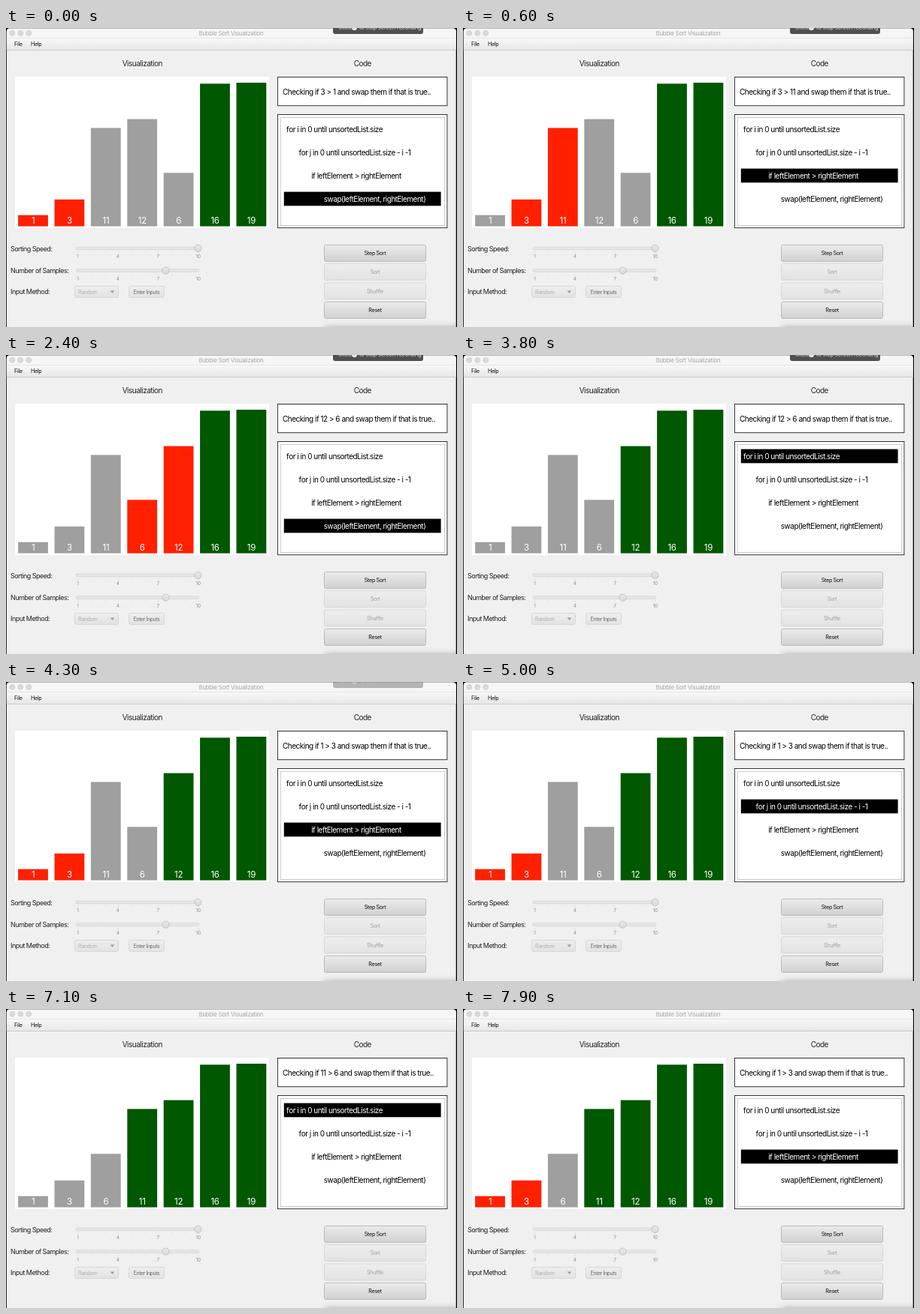
Write an HTML page with a canvas that moves like this. It is 600 by 399 pixels and loops after 8 s.

```html
<!DOCTYPE html>
<html lang="en">
<head>
<meta charset="utf-8">
<title>Bubble Sort Visualization</title>
<style>
html, body { margin: 0; width: 100%; height: 100%; overflow: hidden; background: #f0f0f0; }
canvas { display: block; width: 600px; height: 399px; }
</style>
</head>
<body>
<canvas id="stage"></canvas>
<script>
const W = 600, H = 399, LOOP = 8000;
const canvas = document.getElementById('stage');
const ctx = canvas.getContext('2d');
const dpr = window.devicePixelRatio || 1;
canvas.width = W * dpr;
canvas.height = H * dpr;

const RED = '#ff2000', GRAY = '#9f9f9f', GREEN = '#005800';
const barTop = { 1: 249.7, 3: 228.8, 6: 193.3, 11: 133.4, 12: 121.6, 16: 74.3, 19: 73 };
const code = [
  'for i in 0 until unsortedList.size',
  'for j in 0 until unsortedList.size - i -1',
  'if leftElement > rightElement',
  'swap(leftElement, rightElement)'
];

const start = [1, 3, 11, 12, 6, 16, 19];
const second = [1, 3, 11, 6, 12, 16, 19];
const third = [1, 3, 6, 11, 12, 16, 19];

// at: time in ms, line: highlighted code line, pair: left red bar, sorted: green bars
const steps = [
  { at: 0, line: 3, list: start, pair: 0, sorted: 2, test: '3 > 1' },
  { at: 500, line: 1 },
  { at: 600, line: 2, pair: 1, test: '3 > 11' },
  { at: 1400, line: 1 },
  { at: 1500, line: 2, pair: 2, test: '11 > 12' },
  { at: 2300, line: 1 },
  { at: 2400, line: 3, list: second, pair: 3, test: '12 > 6' },
  { at: 3200, line: 0, pair: -9, sorted: 3 },
  { at: 4100, line: 1 },
  { at: 4200, line: 2, pair: 0, test: '1 > 3' },
  { at: 5000, line: 1 },
  { at: 5100, line: 2, pair: 1, test: '3 > 11' },
  { at: 5900, line: 1 },
  { at: 6000, line: 3, list: third, pair: 2, test: '11 > 6' },
  { at: 6800, line: 0, pair: -9, sorted: 4 },
  { at: 7700, line: 1 },
  { at: 7800, line: 2, pair: 0, test: '1 > 3' }
];

function stateAt(t) {
  return Object.assign({}, ...steps.filter(s => s.at <= t));
}

function text(str, x, y, size, color = '#111', align = 'left', track = -0.05) {
  ctx.font = `${size}px Inter, "Open Sans", sans-serif`;
  ctx.letterSpacing = `${size * track}px`;
  ctx.fontKerning = 'none';
  ctx.textAlign = align;
  ctx.textBaseline = 'alphabetic';
  ctx.fillStyle = color;
  ctx.fillText(str, x, y + size * 0.36);
}

function rect(x, y, w, h, color) {
  ctx.fillStyle = color;
  ctx.fillRect(x, y, w, h);
}

function frame(x, y, w, h, color) {
  rect(x, y, w, h, '#fff');
  ctx.strokeStyle = color;
  ctx.lineWidth = 0.9;
  ctx.strokeRect(x, y, w, h);
}

function shade(y, h, from, to) {
  const g = ctx.createLinearGradient(0, y, 0, y + h);
  g.addColorStop(0, from);
  g.addColorStop(1, to);
  return g;
}

function round(x, y, w, h, r, fill, stroke) {
  ctx.beginPath();
  ctx.roundRect(x, y, w, h, r);
  ctx.fillStyle = fill;
  ctx.fill();
  if (stroke) {
    ctx.strokeStyle = stroke;
    ctx.lineWidth = 0.8;
    ctx.stroke();
  }
}

function disc(x, y, r, fill, stroke) {
  round(x - r, y - r, 2 * r, 2 * r, r, fill, stroke);
}

function button(label, x, y, w, h, on) {
  const fill = on ? shade(y, h, '#ececec', '#d0d0d0') : shade(y, h, '#eeeeee', '#e2e2e2');
  round(x + 0.5, y + 0.5, w - 1, h - 1, 2, fill, on ? '#b0b0b0' : '#d2d2d2');
  text(label, x + w / 2, y + h / 2, 7.2, on ? '#111' : '#a0a0a0', 'center');
}

function slider(y, thumb) {
  round(93, y - 1.8, 164, 3.6, 2, '#e6e6e6', '#d4d4d4');
  for (let i = 0; i < 10; i++) {
    rect(95.5 + i * 17.8, y + 4, 0.6, i % 3 ? 1.5 : 3, '#d6d6d6');
  }
  [1, 4, 7, 10].forEach((n, i) => text(n, 95.5 + i * 53.4, y + 10.8, 6.4, '#909090', 'center', 0));
  disc(thumb, y, 4.6, shade(y - 5, 10, '#eaeaea', '#d8d8d8'), '#bcbcbc');
}

// Shadow of something just below the stage
function drawShadow() {
  ctx.save();
  ctx.shadowColor = 'rgba(0, 0, 0, 0.45)';
  ctx.shadowBlur = 10 * dpr;
  rect(425, 401, 200, 20, '#000');
  ctx.restore();
}

function drawWindow() {
  rect(0, 0, W, H, '#000');
  ctx.beginPath();
  ctx.roundRect(0.8, 0.6, 597.9, H + 10, 4);
  ctx.clip();
  rect(0, 0, W, H, '#f0f0f0');
  rect(0, 0, W, 14, '#f6f6f6');
  rect(0, 13.5, W, 0.8, '#d6d6d6');
  [8.3, 19.2, 30.2].forEach(x => disc(x, 6.8, 3.5, '#d9d9d9', '#d0d0d0'));
  text('Bubble Sort Visualization', 299.5, 7.2, 7.6, '#a4a4a4', 'center', -0.02);
  rect(0, 14, W, 15, shade(14, 15, '#f8f8f8', '#e7e7e7'));
  rect(0, 29, W, 1, '#cbcbcb');
  text('File', 11, 21.5, 7.3);
  text('Help', 33, 21.5, 7.3);
  text('Visualization', 181.3, 47.5, 10, '#222', 'center');
  text('Code', 474.3, 47.5, 10, '#222', 'center');
  drawShadow();
}

function drawControls() {
  text('Sorting Speed:', 6, 295, 9, '#222', 'left', -0.06);
  text('Number of Samples:', 6, 323.3, 9, '#222', 'left', -0.06);
  text('Input Method:', 6, 351.5, 9, '#222', 'left', -0.06);
  slider(294, 255.5);
  slider(323.7, 212.5);
  button('', 91, 344, 59, 16, false);
  text('Random', 96, 352.3, 7.2, '#b0b0b0', 'left', -0.06);
  ctx.fillStyle = '#a0a0a0';
  ctx.beginPath();
  ctx.moveTo(138.5, 350.5);
  ctx.lineTo(144.5, 350.5);
  ctx.lineTo(141.5, 354);
  ctx.fill();
  button('', 163, 344, 48, 16, false);
  text('Enter Inputs', 187, 352.3, 7, '#6a6a6a', 'center', -0.06);
  button('Step Sort', 423, 289, 136, 23, true);
  button('Sort', 423, 314, 136, 23, false);
  button('Shuffle', 423, 339.5, 136, 23, false);
  button('Reset', 423, 365, 136, 23, true);
}

function drawBars({ list, pair, sorted }) {
  rect(12, 65, 338, 202, '#fff');
  list.forEach((n, i) => {
    const x = 16.1 + i * 48.4;
    const red = i === pair || i === pair + 1;
    rect(x, barTop[n], 39.8, 264.6 - barTop[n], red ? RED : i >= 7 - sorted ? GREEN : GRAY);
    text(n, x + 20, 257, 11.5, '#fff', 'center', -0.02);
  });
}

function drawCode({ line, test }) {
  frame(361.4, 65.5, 225.5, 38.2, '#222');
  text(`Checking if ${test} and swap them if that is true..`, 368, 85, 10, '#000');
  frame(361.4, 115.5, 225.5, 151.2, '#222');
  frame(365.2, 119.4, 218.4, 144, '#c4c4c4');
  code.forEach((str, i) => {
    const y = 135 + i * 31;
    if (i === line) rect(369.8, y - 9.4, 208.8, 18.7, '#000');
    text(str, 373 + i * 16.6, y, 10, i === line ? '#fff' : '#000');
  });
}

function drawTip(t) {
  ctx.globalAlpha = Math.max(0, Math.min(1, (4500 - t) / 500));
  round(435, -12, 120, 20, 3, '#505050');
  text('Click', 442, -0.5, 7.6, '#d8d8d8', 'left', 0);
  disc(463.5, -0.5, 3.6, '#e4e4e4');
  text('to stop screen recording', 470, -0.5, 7.4, '#d8d8d8', 'left', -0.02);
  ctx.globalAlpha = 1;
}

function draw() {
  const t = performance.now() % LOOP;
  const state = stateAt(t);
  ctx.save();
  ctx.scale(dpr, dpr);
  drawWindow();
  drawControls();
  drawBars(state);
  drawCode(state);
  ctx.restore();
  ctx.save();
  ctx.scale(dpr, dpr);
  drawTip(t);
  ctx.restore();
  requestAnimationFrame(draw);
}

draw();
</script>
</body>
</html>
```
